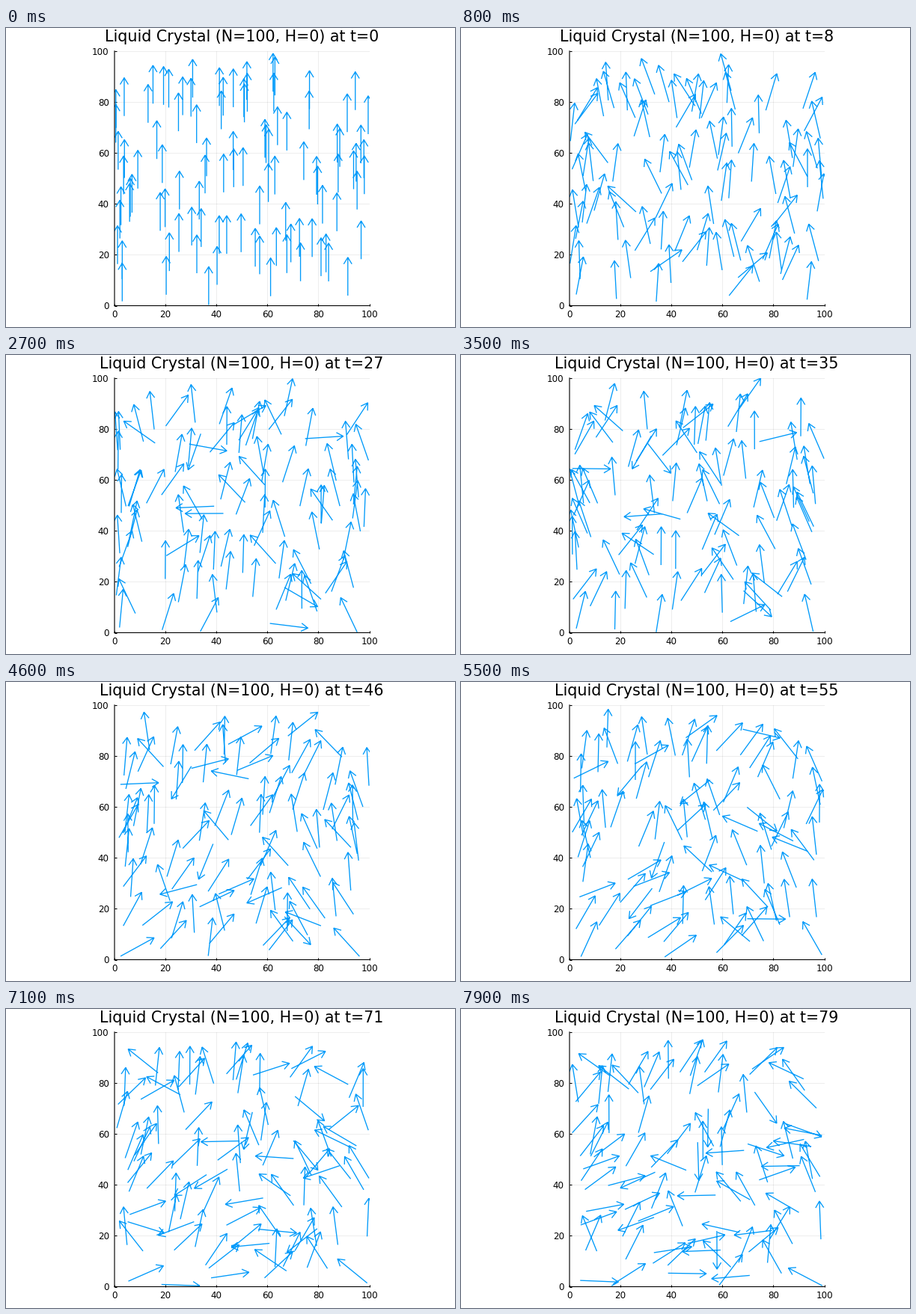
A matplotlib script that plays this animation: 600x400 px, repeating every 8000 ms.

```python
import numpy as np
import matplotlib.pyplot as plt
from matplotlib.animation import FuncAnimation

W, H, DPI = 600, 400, 100
FRAMES, INTERVAL = 80, 100
N, SIZE, LENGTH = 100, 100, 15
HEAD_BACK, HEAD_HALF = 2.6, 1.6
SHIFT, TURN = 1.0, 0.4       # largest trial move and rotation per step
REACH, COUPLING = 12, 2.1    # neighbour range and alignment strength
BLUE = "#009AFA"

plt.rcParams.update({"font.family": "DejaVu Sans", "path.simplify": False})


def direction(angle):
    return np.column_stack([np.cos(angle), np.sin(angle)])


def inside(pos):
    return ((pos >= 0) & (pos <= SIZE)).all(axis=1)


def step(pos, angle, rng):
    """One Metropolis sweep: shift and turn, favouring aligned neighbours."""
    new_pos = pos + rng.uniform(-SHIFT, SHIFT, pos.shape)
    new_angle = angle + rng.uniform(-TURN, TURN, N)

    mid = pos + direction(angle) * LENGTH / 2
    dist2 = ((mid[:, None] - mid[None]) ** 2).sum(axis=2)
    weight = np.exp(-dist2 / (2 * REACH ** 2))
    np.fill_diagonal(weight, 0)
    weight /= weight.sum(axis=1, keepdims=True)

    field = weight @ direction(2 * angle)
    change = direction(2 * new_angle) - direction(2 * angle)
    gain = COUPLING * (field * change).sum(axis=1)
    ok = rng.random(N) < np.exp(np.minimum(gain, 0))
    ok &= inside(new_pos) & inside(new_pos + LENGTH * direction(new_angle))
    return np.where(ok[:, None], new_pos, pos), np.where(ok, new_angle, angle)


def simulate():
    rng = np.random.default_rng(7)
    pos = rng.uniform((0, 0), (SIZE, SIZE - LENGTH), (N, 2))
    angle = np.full(N, np.pi / 2)
    states = [(pos, angle)]
    for _ in range(FRAMES - 1):
        pos, angle = step(pos, angle, rng)
        states.append((pos, angle))
    return states


def outline(pos, angle):
    """All arrows as one polyline, separated by gaps."""
    along = direction(angle)
    across = along[:, ::-1] * (-1, 1)
    tip = pos + LENGTH * along
    neck = tip - HEAD_BACK * along
    gap = np.full_like(pos, np.nan)
    parts = [pos, tip, gap,
             neck + HEAD_HALF * across, tip, neck - HEAD_HALF * across, gap]
    return np.stack(parts, axis=1).reshape(-1, 2).T


fig = plt.figure(figsize=(W / DPI, H / DPI), dpi=DPI, facecolor="white")
ax = fig.add_axes([145 / W, 1 - 371.5 / H, 340.5 / W, 340.7 / H])
ax.set(xlim=(0, SIZE), ylim=(0, SIZE),
       xticks=range(0, SIZE + 1, 20), yticks=range(0, SIZE + 1, 20))
ax.set_axisbelow(True)
ax.grid(color="black", alpha=0.1, linewidth=0.5)
ax.spines[["top", "right"]].set_visible(False)
for side in ("left", "bottom"):
    ax.spines[side].set(linewidth=0.8, snap=False)
ax.tick_params(direction="in", length=2.5, width=0.8, labelsize=8.6)
ax.tick_params(axis="x", pad=4.3)
ax.tick_params(axis="y", pad=5.2)

title = fig.text(315 / W, 1 - 18.3 / H, "", fontsize=14.9,
                 ha="center", va="baseline")
arrows, = ax.plot([], [], color=BLUE, linewidth=0.95,
                  solid_capstyle="butt", solid_joinstyle="miter")
states = simulate()


def draw(t):
    arrows.set_data(*outline(*states[t]))
    title.set_text(f"Liquid Crystal (N=100, H=0) at t={t}")
    return arrows, title


anim = FuncAnimation(fig, draw, frames=FRAMES, interval=INTERVAL,
                     repeat=True, repeat_delay=0)
plt.show()
```
